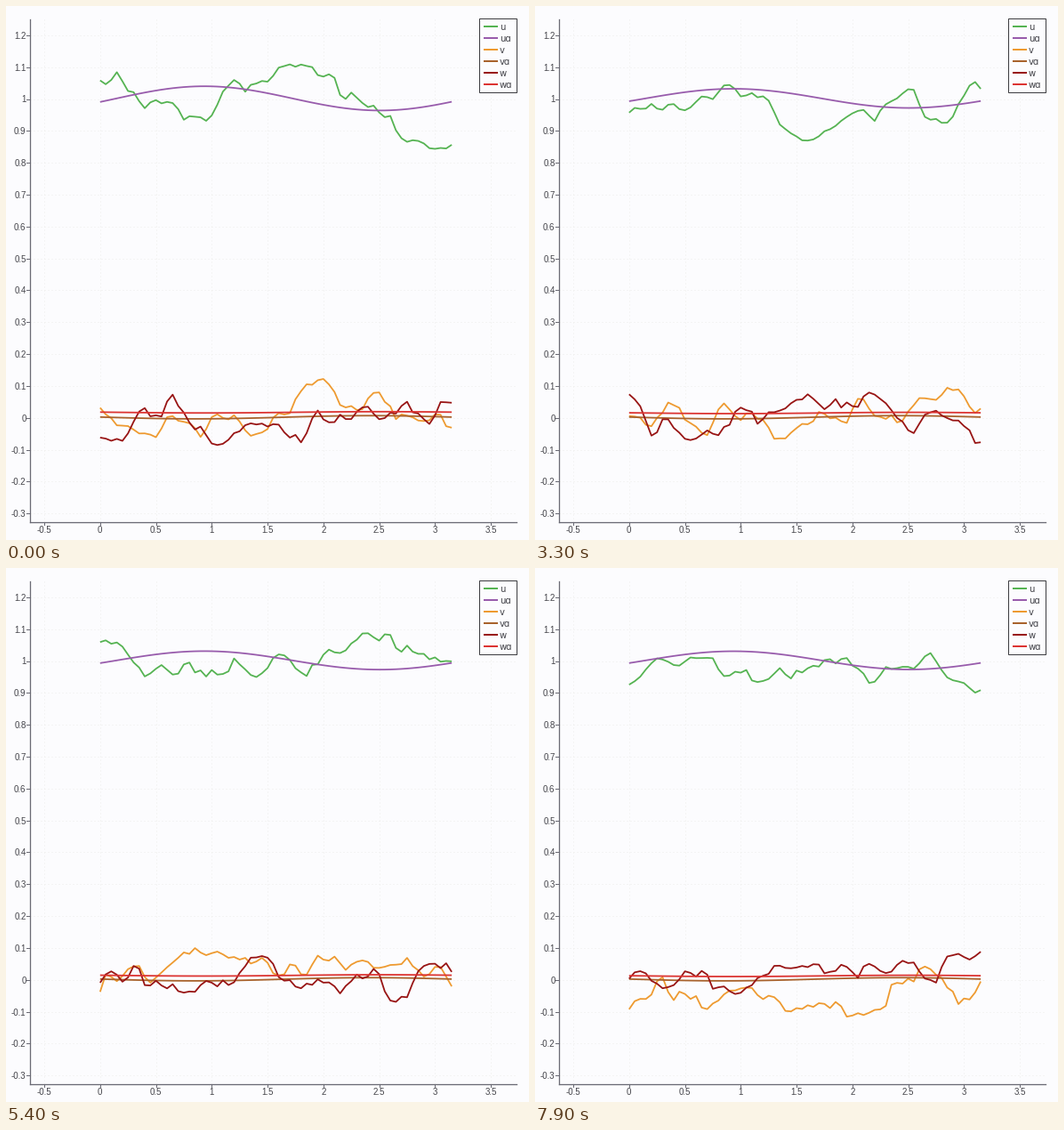
These frames come from a looping animation (588x600 px, 8000 ms). A matplotlib script:

```python
import numpy as np
import matplotlib.pyplot as plt
from matplotlib.animation import FuncAnimation
from matplotlib.patches import Rectangle

W, H, DPI = 588, 600, 100
FRAMES, STEP = 80, 100
PT = 72 / DPI

PAPER, INK, AXIS, GRID = "#fcfcfe", "#44444a", "#6a6a74", "#eeeeec"
COLORS = dict(u="#55b352", ua="#985cac", v="#ee9a30",
              va="#a8622c", w="#981414", wa="#dc3432")

LEFT, RIGHT, TOP, BOTTOM = 26.5, 573.5, 15, 579.5
X = np.arange(64) * 0.05


def px(x):
    return 105.8 + 125.5 * np.asarray(x)


def py(y):
    return 462.8 - 358.3 * np.asarray(y)


def averages(k):
    """Time averages: smooth waves that slowly settle."""
    t = k / (FRAMES - 1)
    swing = 0.0285 + 0.0095 * np.exp(-k / 18)
    wave = np.sin(2 * X - 0.3)
    return dict(ua=1.002 + swing * wave,
                va=0.002 - 0.005 * np.cos(2 * X - 1.7),
                wa=0.0175 - 0.005 * t - 0.002 * wave)


def turbulence(rng):
    """Noise correlated along the line, with soft limits."""
    n = len(X) + 2
    rho = 0.87
    kicks = rng.normal(0, np.sqrt(1 - rho ** 2), n)
    walk = np.empty(n)
    walk[0] = rng.normal()
    for i in range(1, n):
        walk[i] = rho * walk[i - 1] + kicks[i]
    walk = 0.057 * np.convolve(walk, [.15, .7, .15], "valid")
    return 0.18 * np.tanh(walk / 0.18)


def snapshot(k):
    rng = np.random.default_rng(500 + k)
    data = averages(k)
    data["u"] = (1 + data["ua"]) / 2 + turbulence(rng)
    data["v"] = turbulence(rng)
    data["w"] = turbulence(rng)
    return data


fig = plt.figure(figsize=(W / DPI, H / DPI), dpi=DPI, facecolor=PAPER)
ax = fig.add_axes([0, 0, 1, 1])
ax.set(xlim=(0, W), ylim=(H, 0))
ax.axis("off")


def rule(xs, ys, color=AXIS, width=1.0, **kw):
    return ax.plot(xs, ys, color=color, lw=width * PT, **kw)[0]


def label(x, y, text, ha, font="Liberation Sans", size=9.8):
    ax.text(x, y, text, ha=ha, va="center_baseline", color=INK,
            family=font, size=size * PT, zorder=5)


dots = dict(color=GRID, dashes=(1, 3), zorder=1)

for i in range(-3, 13):
    y = py(i / 10)
    rule([LEFT, RIGHT], [y, y], **dots)
    rule([LEFT - 3.5, LEFT], [y, y])
    label(22.5, y, f"{i / 10:g}", "right")
for i in range(-1, 8):
    x = px(i / 2)
    rule([x, x], [TOP, BOTTOM], **dots)
    rule([x, x], [BOTTOM, BOTTOM + 3.5])
    label(x, 587.8, f"{i / 2:g}", "center")

rule([LEFT, LEFT], [TOP, BOTTOM], width=1.3)
rule([LEFT, RIGHT], [BOTTOM, BOTTOM], width=1.3)

# The alpha glyph gives the legend its single-storey "a".
ax.add_patch(Rectangle((532, 14), 41.5, 82.5, facecolor=PAPER,
                       edgecolor="#3c3c40", lw=PT, zorder=4))
for i, (name, color) in enumerate(COLORS.items()):
    y = 22.8 + 13 * i
    rule([537, 553], [y, y], color, 2, zorder=5, solid_capstyle="butt")
    label(555, y, name.replace("a", "\u0251"), "left", "DejaVu Sans", 10)

curves = {name: rule(px(X), py(0 * X), color, 1.8, zorder=3,
                     solid_joinstyle="round", solid_capstyle="butt")
          for name, color in COLORS.items()}


def draw(k):
    for name, y in snapshot(k).items():
        curves[name].set_ydata(py(y))
    return list(curves.values())


anim = FuncAnimation(fig, draw, frames=FRAMES, interval=STEP,
                     repeat=True, repeat_delay=0)
plt.show()
```
